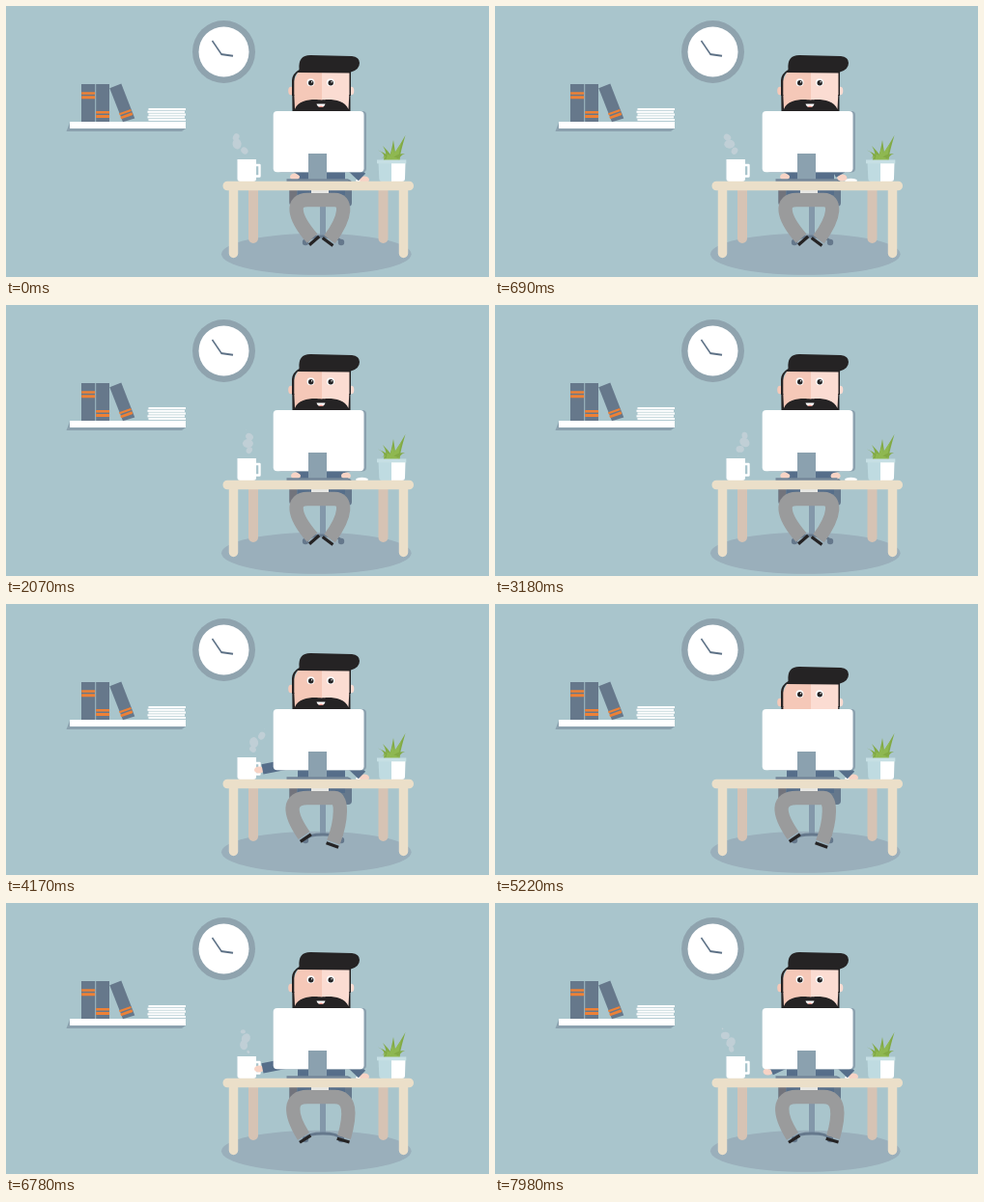
These frames come from a looping animation (500x281 px, 8 s). An HTML page:

```html
<!DOCTYPE html>
<html lang="en">
<head>
<meta charset="utf-8">
<title>Desk work</title>
<style>
html, body { margin: 0; width: 100%; height: 100%; overflow: hidden; background: #a9c5cc; }
svg { display: block; width: 100vw; height: 100vh; }
</style>
</head>
<body>
<svg viewBox="0 0 500 281" preserveAspectRatio="none">
  <defs>
    <g id="eye"><circle r="4" fill="#fff"/><circle cx=".2" cy=".4" r="2.7" fill="#252324"/><circle cx="1.1" cy="-.5" r=".7" fill="#fff"/></g>
    <path id="bands" d="M0 0H14V2.4H0zM0 4H14V7H0z" fill="#ee8136"/>
  </defs>
  <rect width="500" height="281" fill="#a9c5cc"/>

  <g id="clock">
    <circle cx="225.5" cy="47.5" r="32.5" fill="#8fa3ae"/>
    <circle cx="225.5" cy="47.5" r="26" fill="#fff"/>
    <path d="M213.5 36L223 50" stroke="#5d7186" stroke-width="1.5"/>
    <path d="M222.5 50L235 51.7" stroke="#5d7186" stroke-width="2"/>
  </g>

  <g id="shelf">
    <path d="M66 121L62.5 130H182L186 127V121z" fill="#8ba1ae"/>
    <path d="M66 120H186V127H66z" fill="#fff"/>
    <g fill="#66788b">
      <path d="M78 81H92.3V120H78zM93.2 81H107V120H93.2z"/>
      <path d="M107.3 85.3L119.3 80.5L133.3 116.5L121 120.3z"/>
    </g>
    <use href="#bands" x="78.2" y="89.3"/>
    <use href="#bands" x="93.1" y="109"/>
    <use href="#bands" transform="translate(117 111.3) rotate(-20) scale(.92)"/>
    <g id="papers" fill="#fff"></g>
  </g>

  <ellipse cx="321.3" cy="257.3" rx="98.3" ry="21.5" fill="#9aafbb"/>
  <path d="M256 188V241M390.5 188V241" stroke="#d6c3b4" stroke-width="10" stroke-linecap="round"/>

  <g id="chair" fill="#65788c">
    <rect x="293.5" y="180" width="64.5" height="28" rx="4"/>
    <path d="M293.5 190H301V207H297Q293.5 207 293.5 203z" fill="#72747c"/>
    <path d="M325 206H331V240H325z" fill="#8398aa"/>
    <path d="M310 244Q313 239 328 239T347 244" fill="none" stroke="#65788c" stroke-width="3"/>
    <circle cx="310" cy="245" r="3.2"/><circle cx="347" cy="245" r="3.2"/>
  </g>

  <path d="M302 172H351V196H302z" fill="#566e8a"/>
  <g id="legs" fill="none"></g>
  <path d="M316 190H334V194H316z" fill="#e7e7e4"/>

  <g id="head">
    <ellipse cx="295" cy="88" rx="2.8" ry="4.2" fill="#f5c8b8"/>
    <ellipse cx="357.5" cy="88" rx="2.8" ry="4.2" fill="#fbdcd2"/>
    <path d="M297 80L303 67H327V110H297z" fill="#f5c8b8"/>
    <path d="M327 67H356V110H327z" fill="#fbdcd2"/>
    <g fill="#252324">
      <path d="M296 93V77Q296.5 70 303.5 66Q302 51 315 51L358 52Q366 53 366 59Q366 66 357 68.5V93H355.5V69.5L302 69Q298.5 72 298.3 78V93z"/>
      <path d="M296.3 92H298.3L299 107C303 96 320 96.5 326.5 97.5C334 96.5 350 96 354.5 107L355.3 92H356.5V110H296.5z"/>
    </g>
    <path d="M321.5 101.5H330.5Q329.5 105 326 105T321.5 101.5" fill="#fff"/>
    <path d="M323.5 104Q326 103 328.8 104Q326 106 323.5 104" fill="#e88b80"/>
    <use href="#eye" x="315.5" y="79.3"/>
    <use href="#eye" x="336" y="79.3"/>
  </g>

  <ellipse cx="368.5" cy="181" rx="6.5" ry="2.2" fill="#fff"/>
  <g id="steam" fill="#c0cfd6"></g>
  <g id="cup">
    <path d="M257 165H262.5V176.5H257" fill="none" stroke="#fff" stroke-width="2.4" stroke-linejoin="round"/>
    <path d="M239.5 159H259V179Q259 182 256 182H242.5Q239.5 182 239.5 179z" fill="#fff"/>
  </g>
  <g id="arms"></g>

  <g id="monitor">
    <rect x="281" y="109" width="92" height="63.5" rx="4" fill="#8ba1af"/>
    <rect x="276.7" y="109" width="93.8" height="63.3" rx="4" fill="#fff"/>
    <path d="M313 153H332V180H313z" fill="#8ba1af"/>
    <path d="M290.5 179.3H354.5V182.5H290.5z" fill="#748799"/>
  </g>

  <g id="plant">
    <g id="leaves"></g>
    <path d="M385.5 162H399V182H389Q386.5 182 386.3 179z" fill="#bfdbe1"/>
    <path d="M399 162H413.5L413 179Q412.8 182 410 182H399z" fill="#fff"/>
    <path d="M384 159.5H414.3V163.3H384z" fill="#c6dfe4"/>
  </g>

  <path d="M235.5 187V256.5M411.5 187V256.5" stroke="#ebdfc9" stroke-width="9.5" stroke-linecap="round"/>
  <rect x="224.5" y="181.7" width="197.5" height="9.6" rx="4.6" fill="#ebdfc9"/>
</svg>
<script>
const LOOP = 8000;
const $ = id => document.getElementById(id);

function set(node, attrs) {
  for (const key in attrs) node.setAttribute(key, attrs[key]);
}
function make(parent, tag, attrs = {}) {
  const node = document.createElementNS('http://www.w3.org/2000/svg', tag);
  set(node, attrs);
  return $(parent).appendChild(node);
}
const mix = (a, b, k) => a.map((v, i) => v + (b[i] - v) * k);

// Smooth rise from 0 to 1 between two times.
function ramp(t, from, to) {
  const k = Math.min(1, Math.max(0, (t - from) / (to - from)));
  return k * k * (3 - 2 * k);
}

for (let i = 0; i < 5; i++) {
  make('papers', 'rect', { x: 147.5 - i % 2, y: 106 + i * 2.75, width: 38.5, height: 2.1 });
}

function leaf(x, y, fill) {
  const base = 399 + (x - 399) * .3;
  make('leaves', 'path', { fill, d: `M${base - 4} 160Q${base - 1} 153 ${x} ${y}Q${base + 4} 155 ${base + 4} 160z` });
}
[[385, 149.5], [390, 145], [401, 139], [413.5, 134], [413, 153]].forEach(([x, y]) => {
  leaf(x, y, '#82aa45');
  leaf(x + (399 - x) * .3, y + 8, '#8fb851');
});

// A leg bows out to the knee and ends in a shoe set across the ankle.
function makeLeg(hip) {
  const shoe = make('legs', 'path', { stroke: '#252324', 'stroke-width': 3.2 });
  const limb = make('legs', 'path', { stroke: '#9a9b9c', 'stroke-width': 14.3 });
  return ([knee, x, y]) => {
    const low = y - 24;
    const length = Math.hypot(x - knee, y - low);
    const ux = (x - knee) / length, uy = (y - low) / length;
    const cx = x + ux * 3.2, cy = y + uy * 3.2;
    const dx = uy * 6.7, dy = -ux * 6.7;
    set(limb, { d: `M326 201H${hip}C${knee} 201 ${knee} ${low} ${x} ${y}` });
    set(shoe, { d: `M${cx - dx} ${cy - dy}L${cx + dx} ${cy + dy}` });
  };
}
const drawLeft = makeLeg(312), drawRight = makeLeg(340);
// Knee x, ankle x and ankle y of each leg.
const crossed = { left: [296, 317, 241], right: [353, 335, 242] };
const swung = { left: [292, 308.5, 240], right: [348, 339, 247] };
const apart = { left: [293, 308, 242], right: [357, 350, 243] };

function drawLegs(t) {
  const swing = ramp(t, 3300, 4000), spread = ramp(t, 5300, 5950);
  const pose = side => mix(mix(crossed[side], swung[side], swing), apart[side], spread);
  drawLeft(pose('left'));
  drawRight(pose('right'));
}

function makeArm(shoulder) {
  const hand = make('arms', 'ellipse', { rx: 5, ry: 3.6, fill: '#f7d3c5' });
  const sleeve = make('arms', 'path', { stroke: '#566e8a', 'stroke-width': 10.5 });
  return point => {
    const length = Math.hypot(point[0] - shoulder[0], point[1] - shoulder[1]);
    set(hand, { cx: point[0], cy: point[1] });
    set(sleeve, { d: `M${shoulder}L${mix(point, shoulder, 3.5 / length)}` });
  };
}
const drawCupArm = makeArm([308, 163]), drawMouseArm = makeArm([348, 158]);

function drawArms(t, lift) {
  const tap = 1.5 * Math.sin(t / 80);
  const grip = ramp(t, 3400, 4000) - ramp(t, 6750, 9000);
  const mouse = 1 - ramp(t, 0, 1200) + ramp(t, 3100, 3700);
  const [x, y] = mix([299 + tap, 177], [262, 172], grip);
  drawCupArm([x + lift[0], y + lift[1]]);
  drawMouseArm(mix([353 - tap, 177], [371, 180], mouse));
}

// Steam rises in a steady stream that a slow draught bends sideways.
const puffs = Array.from({ length: 4 }, () => make('steam', 'ellipse'));

function drawSteam(t) {
  const wind = 18 * Math.sin((t - 2000) / 1385);
  puffs.forEach((puff, i) => {
    const age = (t / 1400 + i / puffs.length) % 1;
    const size = Math.sin(Math.PI * age);
    const x = 250 + wind * age + 2 * Math.sin(i * 2.4);
    set(puff, {
      rx: 5.5 * size, ry: 4.5 * size,
      transform: `translate(${x} ${157 - 28 * age}) rotate(${i * 40})`
    });
  });
}

function draw(t) {
  const sip = ramp(t, 4250, 4850) - ramp(t, 5900, 6500);
  const bow = ramp(t, 4350, 4850) - ramp(t, 5750, 6300);
  const lift = [56 * sip, -28 * sip];
  drawLegs(t);
  drawArms(t, lift);
  drawSteam(t);
  set($('steam'), { visibility: sip > .02 ? 'hidden' : 'visible' });
  set($('cup'), { transform: `translate(${lift})` });
  set($('head'), { transform: `translate(0 ${14 * bow})` });
}

const start = performance.now();
function tick() {
  draw((performance.now() - start) % LOOP);
  requestAnimationFrame(tick);
}
tick();
</script>
</body>
</html>
```
